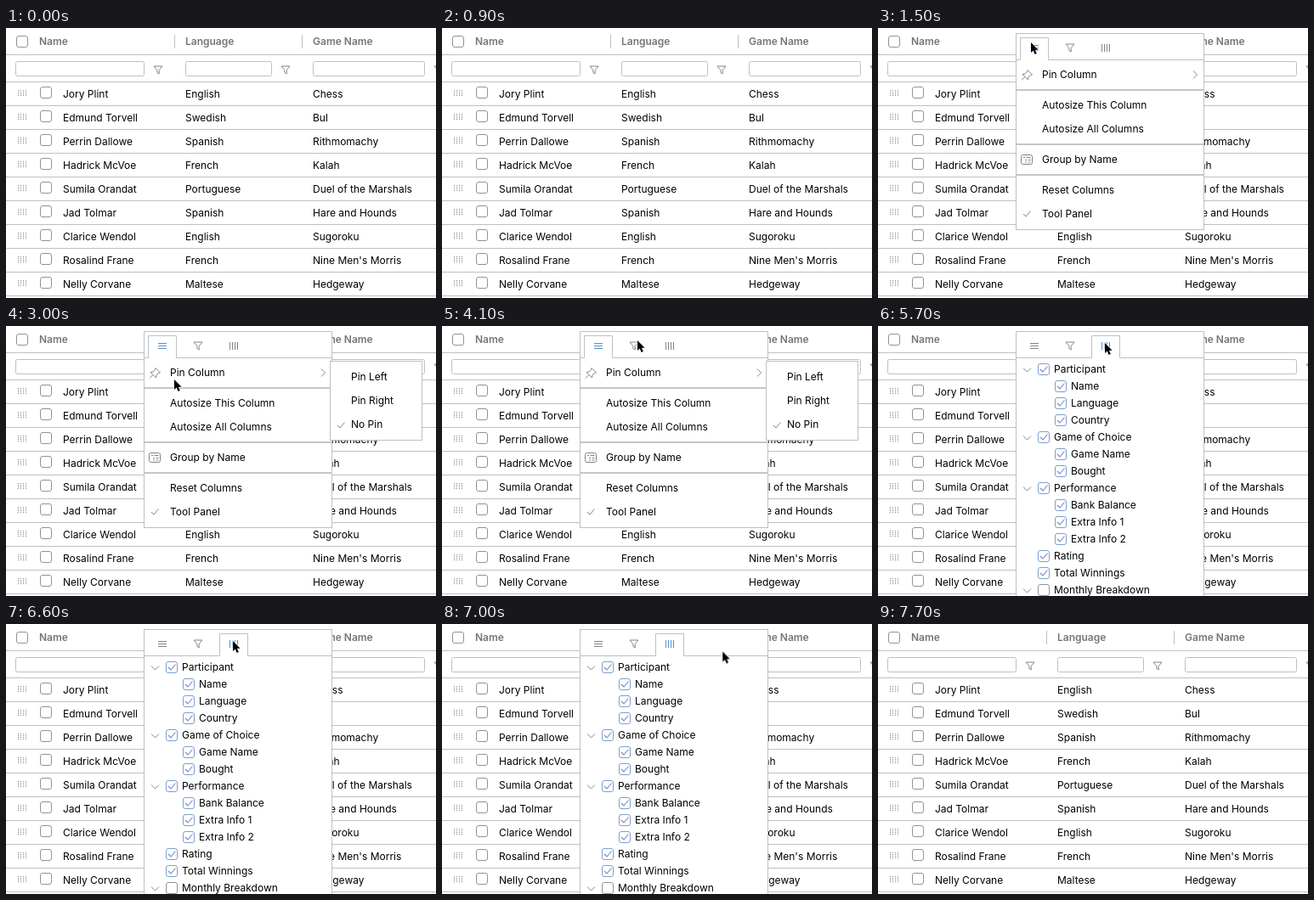
These frames come from a looping animation (506x318 px, 7.8 s). An HTML page:

```html
<!DOCTYPE html>
<html lang="en">
<head>
<meta charset="utf-8">
<title>Grid column menu</title>
<style>
  html, body { margin: 0; width: 100%; height: 100%; overflow: hidden; background: #fff; }
  svg { display: block; width: 506px; height: 318px; }
  text { font: 12px Inter, "Open Sans", sans-serif; fill: #000; white-space: pre; }
  .head { font-weight: 600; fill: #757575; }
  .bold { font-weight: 700; letter-spacing: .25px; }
  .hint { fill: #757575; }
  .line { fill: none; stroke: #bdc0c2; }
  .box { fill: #fff; stroke: #8d9496; }
  .field, .panel { fill: #fff; stroke: #bdc0c2; }
  .icon { fill: none; stroke: #7f8688; }
  .on { stroke: #5590d0; }
  .boxOn { fill: #fff; stroke: #7d9fcd; }
  .tick { fill: none; stroke: #7a84c6; stroke-width: 1.1; }

  #menu, #sub, #filter, #columns { visibility: hidden; animation: 7.8s step-end infinite; }
  #menu { animation-name: menu; }
  #sub { animation-name: sub; }
  #filter { animation-name: filter; }
  #columns { animation-name: columns; }
  #cursor { animation: cursor 7.8s step-end infinite; }

  @keyframes menu { 0%, 55.12% { visibility: hidden; } 16.66% { visibility: visible; } }
  @keyframes sub { 0%, 55.12% { visibility: hidden; } 33.33% { visibility: visible; } }
  @keyframes filter { 0%, 73.07% { visibility: hidden; } 55.12% { visibility: visible; } }
  @keyframes columns { 0%, 92.3% { visibility: hidden; } 73.07% { visibility: visible; } }
  @keyframes cursor {
    0% { transform: translate(186px, -20px); }
    11.53% { transform: translate(186px, -20px); animation-timing-function: steps(3); }
    15.38% { transform: translate(180px, 17px); }
    25.64% { transform: translate(180px, 17px); animation-timing-function: steps(5); }
    32.05% { transform: translate(198px, 63px); }
    41.02% { transform: translate(198px, 63px); animation-timing-function: steps(3); }
    44.87% { transform: translate(230px, 17px); }
    66.66% { transform: translate(230px, 17px); animation-timing-function: steps(3); }
    70.51% { transform: translate(267px, 20px); }
    88.46% { transform: translate(267px, 20px); animation-timing-function: steps(4); }
    93.58%, 100% { transform: translate(520px, 70px); }
  }
</style>
</head>
<body>
<svg id="stage" viewBox="0 0 506 318"></svg>
<script>
const rows = [
  ['Jory Plint', 'English', 'Chess'],
  ['Edmund Torvell', 'Swedish', 'Bul'],
  ['Perrin Dallowe', 'Spanish', 'Rithmomachy'],
  ['Hadrick McVoe', 'French', 'Kalah'],
  ['Sumila Orandat', 'Portuguese', 'Duel of the Marshals'],
  ['Jad Tolmar', 'Spanish', 'Hare and Hounds'],
  ['Clarice Wendol', 'English', 'Sugoroku'],
  ['Rosalind Frane', 'French', "Nine Men's Morris"],
  ['Nelly Corvane', 'Maltese', 'Hedgeway'],
];

// Leading mark: "+" group with children, "-" child, "=" plain leaf, "o" unchecked group.
const tree = ['+Participant', '-Name', '-Language', '-Country', '+Game of Choice',
  '-Game Name', '-Bought', '+Performance', '-Bank Balance', '-Extra Info 1',
  '-Extra Info 2', '=Rating', '=Total Winnings', 'oMonthly Breakdown'];

const range = n => [...Array(n).keys()];
const each = (list, fn) => list.map(fn).join('');
const text = (x, y, s, cls = '') => `<text x="${x}" y="${y}" class="${cls}">${s}</text>`;
const path = (d, cls) => `<path d="${d}" class="${cls}"/>`;
const rect = (x, y, w, h, cls, r = 0) =>
  `<rect x="${x + .5}" y="${y + .5}" width="${w}" height="${h}" rx="${r}" class="${cls}"/>`;
const group = (id, body) => `<g id="${id}">${body}</g>`;

const checkbox = (cx, cy, cls = 'box') => rect(cx - 7, cy - 7, 13, 13, cls, 2.5);
const tick = (cx, cy, cls) => path(`M${cx - 4} ${cy}l3 3 5.5-6.5`, cls);
const funnel = (cx, cy, cls = 'icon') =>
  path(`M${cx - 5} ${cy - 4}h10l-3.8 4.5v4.5l-2.4-1.6v-2.9z`, cls);
const burger = (cx, cy, cls) => path(each([-2.5, .5, 3.5], d => `M${cx - 5} ${cy + d}h10`), cls);
const bars = (cx, cy, cls) => path(each([-4.5, -1.5, 1.5, 4.5], d => `M${cx + d} ${cy - 4}v9`), cls);

function grip(y) {
  const dots = each(range(16), i => `M${14 + i % 4 * 3} ${y - 2.5 + (i >> 2) * 2}h1`);
  return path(dots, 'icon');
}

function grid() {
  const heads = [[39, 'Name'], [211, 'Language'], [361, 'Game Name']];
  const fields = [[11, 151], [211, 101], [361, 131]];
  return checkbox(19, 16) +
    each(heads, ([x, s]) => text(x, 20, s, 'head')) +
    path('M198.5 8v16M348.5 8v16M0 31.5h506', 'line') +
    each(fields, ([x, w]) => rect(x, 39, w, 17, 'field', 2) + funnel(x + w + 17, 49)) +
    path(each(range(10), i => `M0 ${63.5 + 28 * i}h506`), 'line') +
    each(rows, ([name, lang, game], i) => {
      const y = 76 + 28 * i;
      return grip(y) + checkbox(47, y) +
        text(67, y + 6, name) + text(211, y + 6, lang) + text(361, y + 6, game);
    });
}

// Popup frame with its tab strip; the active tab opens into the content.
function popup(active, height) {
  const left = 167.5 + 42 * active;
  const icons = [burger, funnel, bars];
  return rect(162, 6, 221, height, 'panel') +
    path(`M162 37.5H${left}V11.5h33v26H384`, 'line') +
    each(icons, (icon, i) => icon(184 + 42 * i, 23, i === active ? 'icon on' : 'icon'));
}

function mainMenu() {
  const items = [[55, 'Pin Column'], [91, 'Autosize This Column'], [119, 'Autosize All Columns'],
    [155, 'Group by Name'], [191, 'Reset Columns'], [219, 'Tool Panel']];
  return popup(0, 231) +
    '<path d="M163 73h221M163 137h221M163 173h221" stroke="#c3c6c8" stroke-width="2"/>' +
    each(items, ([y, s]) => text(193, y + 4, s)) +
    path('M176 49.5l5.5 5.5-2 .5-2.5 2.5-.5 3-6.5-6.5 3-.5 2.5-2.5zM173 57.5l-4 4', 'icon') +
    path('M371 50.5l4.5 4.5-4.5 4.5', 'icon') +
    rect(168, 149, 13, 11, 'icon', 2) +
    path('M171 152.5h2M174.5 152.5h5M173 155.5h2M176.5 155.5h3M173 158h2M176.5 158h3', 'icon') +
    tick(175, 219, 'icon');
}

function pinMenu() {
  return rect(381, 41, 108, 93, 'panel') +
    each(['Pin Left', 'Pin Right', 'No Pin'], (s, i) => text(406, 64 + 28 * i, s)) +
    tick(394, 117, 'icon');
}

function filterPanel() {
  const lines = [[121, 'This filter does partial word search'],
    [136, 'on multiple words, e.g. "radw fenk"'], [151, 'still brings back Radwell Fenkot.'],
    [186, 'Just to illustrate that anything can'], [201, 'go in here, here is an image:']];
  return popup(1, 311) +
    text(167, 56, 'Custom Athlete Filter', 'bold') +
    rect(167, 65, 134, 19, 'field', 2) +
    text(173, 79, 'Full name search...', 'hint') +
    each(lines, ([y, s]) => text(167, y, s)) +
    rect(177, 214, 149, 84, 'panel') +
    '<circle cx="216" cy="256" r="29" fill="#c3262b"/>';
}

function columnsPanel() {
  return popup(2, 330) + each(tree, (item, i) => {
    const kind = item[0], y = 51 + 20 * i;
    const x = kind === '-' ? 215 : 195;
    const open = '+o'.includes(kind) ? path(`M171 ${y - 1.5}l4.5 4.5 4.5-4.5`, 'icon') : '';
    const box = kind === 'o' ? checkbox(x, y) : checkbox(x, y, 'boxOn') + tick(x, y, 'tick');
    return open + box + text(x + 12, y + 4, item.slice(1));
  });
}

const arrow = '<path d="M0 0v12l2.7-2.5 1.9 4.4 2.2-1-1.9-4.2h3.7z" stroke="#fff" stroke-width="1.4" paint-order="stroke"/>';

document.getElementById('stage').innerHTML = grid() +
  group('menu', mainMenu()) + group('sub', pinMenu()) +
  group('filter', filterPanel()) + group('columns', columnsPanel()) +
  group('cursor', arrow);
</script>
</body>
</html>
```
